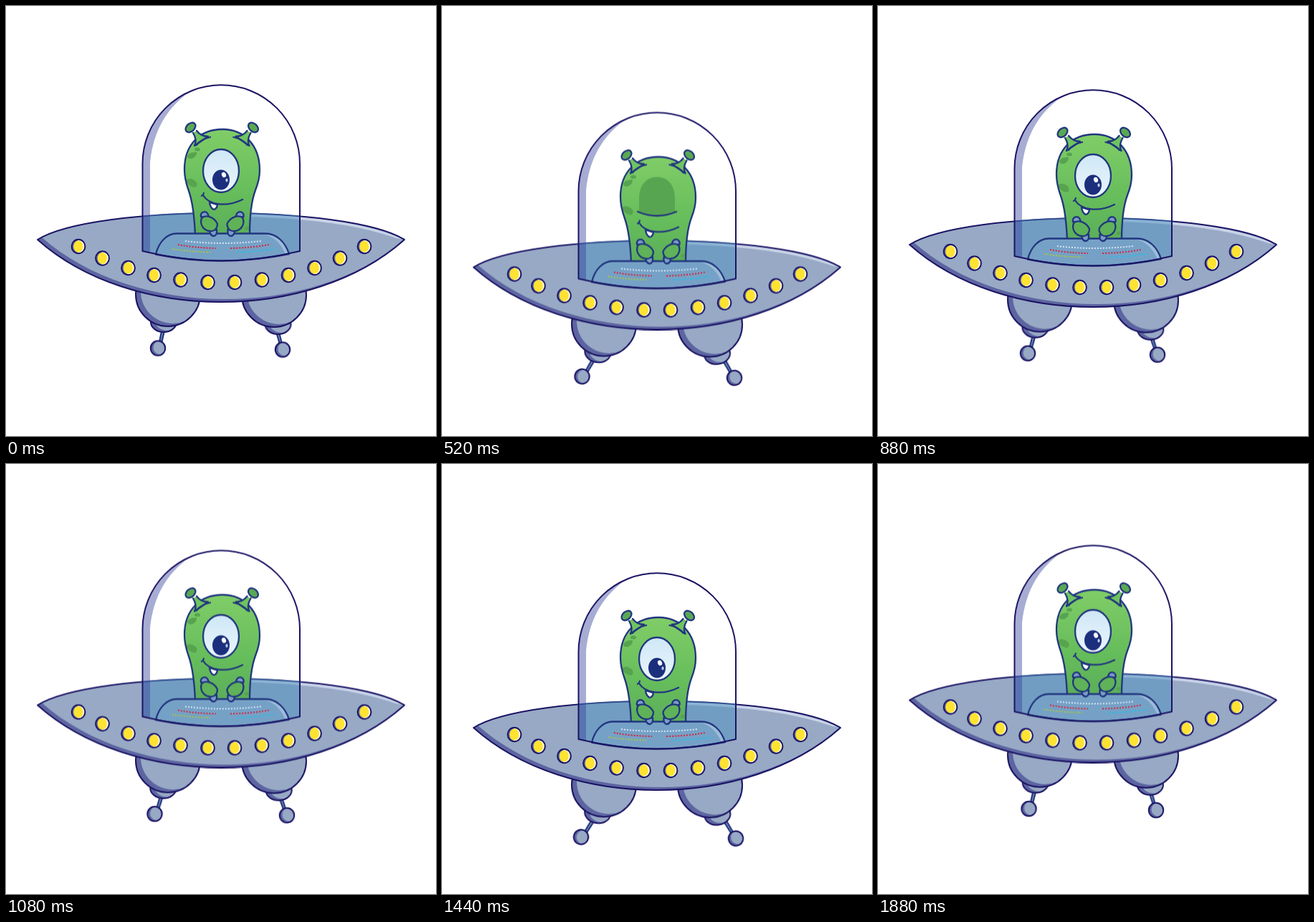
These frames come from a looping animation (600x600 px, 1920 ms). An HTML page without scripts:

```html
<!DOCTYPE html>
<html lang="en">
<head>
<meta charset="utf-8">
<title>Hovering saucer</title>
<style>
html, body { margin: 0; width: 100%; height: 100%; overflow: hidden; background: #fff; }
svg { display: block; width: 100vw; height: 100vh; }

.ship, .dome, .cap, .foot { animation: 960ms infinite; }
.ship { animation-name: hover; }
.dome { animation-name: sink; }
.l .cap { animation-name: capL; }
.r .cap { animation-name: capR; }
.l .foot { animation-name: footL; }
.r .foot { animation-name: footR; }
.open { animation: open 1920ms step-end infinite; }
.shut { opacity: 0; animation: shut 1920ms step-end infinite; }

/* 12 steps each way, 40 ms per step */
@keyframes hover {
  0%, 100% { transform: translate(0, 0); animation-timing-function: steps(12); }
  50% { transform: translate(0, 42px); animation-timing-function: steps(12); }
}
@keyframes sink {
  0%, 100% { transform: translate(0, 0); animation-timing-function: steps(12); }
  50% { transform: translate(0, 3.3px); animation-timing-function: steps(12); }
}
@keyframes capL {
  0%, 100% { transform: translate(0, 0) rotate(0deg); animation-timing-function: steps(12); }
  50% { transform: translate(-4px, 4px) rotate(10deg); animation-timing-function: steps(12); }
}
@keyframes capR {
  0%, 100% { transform: translate(0, 0) rotate(0deg); animation-timing-function: steps(12); }
  50% { transform: translate(6px, 3.5px) rotate(-10deg); animation-timing-function: steps(12); }
}
@keyframes footL {
  0%, 100% { transform: translate(0, 0) rotate(0deg); animation-timing-function: steps(12); }
  50% { transform: translate(-18px, 1px) rotate(20deg); animation-timing-function: steps(12); }
}
@keyframes footR {
  0%, 100% { transform: translate(0, 0) rotate(0deg); animation-timing-function: steps(12); }
  50% { transform: translate(24px, 1px) rotate(-16deg); animation-timing-function: steps(12); }
}
@keyframes open { 0% { opacity: 1; } 22.9% { opacity: 0; } 31.2% { opacity: 1; } }
@keyframes shut { 0% { opacity: 0; } 22.9% { opacity: 1; } 31.2% { opacity: 0; } }

.line { fill: none; stroke: #1b1464; stroke-width: 2; stroke-linejoin: round; }
.ink { stroke: #22367f; stroke-width: 2.3; stroke-linejoin: round; stroke-linecap: round; }
.lit { fill: #97a9c5; }
.dark { fill: #5d65a1; }
.dots path { fill: none; stroke-width: 2; stroke-dasharray: 2 2; }
</style>
</head>
<body>
<svg viewBox="0 0 600 600">
<defs>
  <linearGradient id="skin" x1="0" y1="0" x2="0" y2="1">
    <stop offset="0" stop-color="#80cd68"/>
    <stop offset=".6" stop-color="#66bd5b"/>
    <stop offset="1" stop-color="#5bae5a"/>
  </linearGradient>
  <linearGradient id="white" x1="0" y1="0" x2="0" y2="1">
    <stop offset="0" stop-color="#cfe7f6"/>
    <stop offset="1" stop-color="#eaf6fc"/>
  </linearGradient>
  <path id="hullShape" d="M44 326C122 276.500 478 276.500 556 326C426 442 174 442 44 326Z"/>
  <path id="glassShape" d="M190.500 342V220A109.750 109.750 0 0 1 410 220V342Q300 369 190.500 342Z"/>
  <path id="panelShape" d="M209 346.500C213 330 224 317.500 238 317.500H362C378 317.500 390 330 395 346Q300 365 209 346.500Z"/>
  <path id="headShape" d="M264 320C263 296 261 275 255 258C251 247 249 240 249 228C249 192 272 172 302 172C332 172 354 194 354 229C354 240 352 247 348 257C342 273 340 293 340 320Z"/>
  <clipPath id="hullClip"><use href="#hullShape"/></clipPath>
  <clipPath id="glassClip"><use href="#glassShape"/></clipPath>
  <clipPath id="panelClip"><use href="#panelShape"/></clipPath>
  <clipPath id="headClip"><use href="#headShape"/></clipPath>
  <clipPath id="domeClip"><circle r="45"/></clipPath>
  <clipPath id="footClip"><circle r="10"/></clipPath>
  <clipPath id="capClip"><ellipse cy="-6" rx="18" ry="14"/></clipPath>

  <g id="dome">
    <circle r="45" class="dark"/>
    <circle cx="7" cy="-4" r="45" class="lit" clip-path="url(#domeClip)"/>
    <circle r="45" class="line"/>
  </g>
  <g id="cap">
    <ellipse cy="-6" rx="18" ry="14" class="dark"/>
    <ellipse cx="6" cy="-8" rx="18" ry="14" class="lit" clip-path="url(#capClip)"/>
    <ellipse cy="-6" rx="18" ry="14" class="line"/>
  </g>
  <g id="ball">
    <circle r="10" class="dark"/>
    <circle cx="3" cy="-1" r="9.500" class="lit" clip-path="url(#footClip)"/>
    <circle r="10.200" class="line"/>
  </g>
  <g id="lamp">
    <ellipse rx="9.300" ry="9.600" fill="#fffbe0"/>
    <path d="M0-9.600A9.300 9.600 0 0 0 0 9.600Q-9 0 0-9.600Z" fill="#5d65a1"/>
    <ellipse cx="-.2" rx="6.600" ry="8" fill="#fee333"/>
    <ellipse rx="9.400" ry="9.700" class="line"/>
  </g>
  <g id="horn" class="ink" fill="#6fc45f">
    <path d="M261 177Q267 187 263 195L282 182Q272 182 266 174"/>
    <path d="M266 194Q271 186 285 183" fill="none"/>
    <ellipse cx="257.500" cy="169.500" rx="8" ry="5.500" transform="rotate(-42 257.500 169.500)" fill="#5aa853"/>
  </g>
  <g id="hand" class="ink">
    <path d="M272 294C271 288 277 285 281 289L284 296Z" fill="#7a9cc8"/>
    <path d="M284 313L294 312Q295 320 290 321Q285 321 284 313Z" fill="#7a9cc8"/>
    <path d="M273 296C279 290 291 295 295 304C295 311 290 315 284 314C275 313 270 304 273 296Z" fill="#5fb258"/>
  </g>
</defs>

<g class="ship">
  <g class="l">
    <g transform="translate(212 477.500)"><g class="foot">
      <path d="M2-8L6-28L9.500-27L5-7Z" class="lit ink"/>
      <use href="#ball"/>
    </g></g>
    <g transform="translate(220 447)"><g class="cap"><use href="#cap"/></g></g>
    <g transform="translate(226 402)"><g class="dome"><use href="#dome"/></g></g>
  </g>
  <g class="r">
    <g transform="translate(386 479.500)"><g class="foot">
      <path d="M-4-8L-9.500-27L-6-28L-1-8Z" class="lit ink"/>
      <use href="#ball"/>
    </g></g>
    <g transform="translate(379.500 450)"><g class="cap"><use href="#cap"/></g></g>
    <g transform="translate(374 403)"><g class="dome"><use href="#dome"/></g></g>
  </g>

  <g clip-path="url(#hullClip)">
    <use href="#hullShape" class="dark"/>
    <use href="#hullShape" class="lit" transform="translate(5 -4)"/>
    <path d="M44 326C122 276.500 478 276.500 556 326V270H44Z" class="lit"/>
    <path d="M300 289C410 289 500 301 556 326L545 324C490 305 420 295 300 293Z" fill="#c9d3e8"/>
  </g>
  <use href="#hullShape" class="line"/>

  <g clip-path="url(#glassClip)">
    <use href="#hullShape" fill="#4a90c0" stroke="#4a90c0" stroke-width="2" opacity=".48"/>
    <path d="M190 350V220A110 110 0 0 1 262 116Q208 150 201 218V350Z" fill="#33409a" opacity=".43"/>
  </g>

  <use href="#headShape" fill="url(#skin)"/>
  <g clip-path="url(#headClip)" fill="#57a34f">
    <path d="M253 210Q255 203 266 204Q267 209 260 213Q254 214 253 210Z"/>
    <ellipse cx="267" cy="200" rx="4" ry="2.500"/>
    <path d="M250 243Q259 238 266 246Q268 252 263 253Q254 251 250 243Z"/>
    <ellipse cx="336" cy="310" rx="3" ry="2.500"/>
  </g>
  <use href="#headShape" fill="none" class="ink"/>
  <use href="#horn"/>
  <use href="#horn" transform="matrix(-1 0 0 1 602.500 0)"/>

  <g class="open">
    <ellipse cx="300" cy="230" rx="25" ry="30" fill="url(#white)" class="ink"/>
    <ellipse cx="300" cy="242.500" rx="12" ry="14" fill="#1c2f7c"/>
    <ellipse cx="304" cy="235.500" rx="3" ry="3.800" fill="#fff" transform="rotate(-20 304 235.500)"/>
    <ellipse cx="308" cy="243" rx="1.600" ry="2.500" fill="#b9d4ee"/>
  </g>
  <g class="shut">
    <path d="M275 250V230C275 212 285 200 300 200S325 212 325 230V250Q300 260 275 250Z" fill="#58a551"/>
    <path d="M273 248.500Q300 260 327 248.500" fill="none" class="ink"/>
  </g>

  <path d="M284 274L295 277.500Q294 283 290 284Q285 282 284 274Z" fill="#fff" class="ink"/>
  <path d="M273 265Q275 264 276 261M275 264C283 278 308 281 330 270" fill="none" class="ink"/>

  <g clip-path="url(#panelClip)">
    <use href="#panelShape" fill="#76a1c6"/>
    <path d="M358 318H364C380 318 391 332 396 350H391C386 333 374 321 358 318Z" fill="#9dbcd9"/>
  </g>
  <use href="#panelShape" fill="none" class="ink"/>
  <g class="dots">
    <path d="M250 328Q302 334 356 328" stroke="#d3e4f5"/>
    <path d="M240 333Q264 337.500 293 338M313 338Q342 337.500 367 333" stroke="#d8223a"/>
    <path d="M232 339Q258 343 285 343.500" stroke="#a3c840"/>
    <path d="M322 343.500Q350 343 375 339" stroke="#25bfe6"/>
  </g>
  <use href="#hand"/>
  <use href="#hand" transform="matrix(-1 0 0 1 603.500 0)"/>
  <use href="#glassShape" class="line"/>

  <use href="#lamp" x="101" y="335.500"/>
  <use href="#lamp" x="134.500" y="352"/>
  <use href="#lamp" x="170.500" y="365.500"/>
  <use href="#lamp" x="206.500" y="375.500"/>
  <use href="#lamp" x="243.500" y="382"/>
  <use href="#lamp" x="281.500" y="385.500"/>
  <use href="#lamp" x="319" y="385.500"/>
  <use href="#lamp" x="357" y="382"/>
  <use href="#lamp" x="394" y="375.500"/>
  <use href="#lamp" x="430.500" y="365.500"/>
  <use href="#lamp" x="466" y="352"/>
  <use href="#lamp" x="500" y="335.500"/>
</g>
</svg>
</body>
</html>
```
